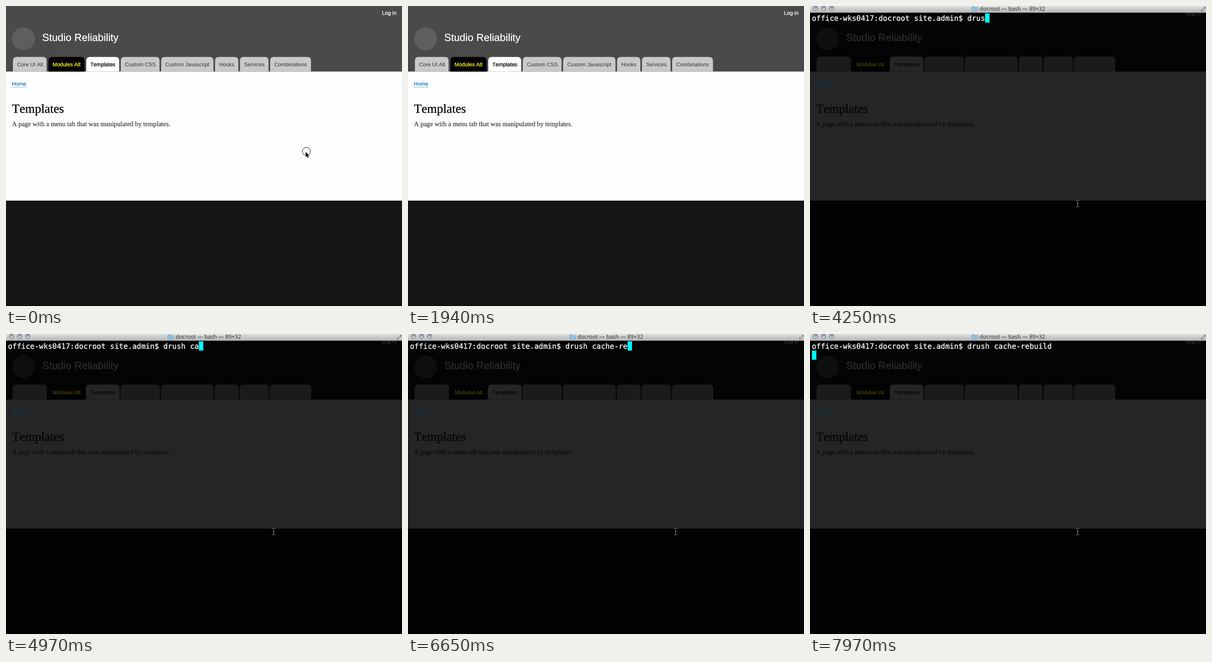
Recreate the animation shown at these times as an HTML page. Size 859 px wide and 652 px high, loop 8000 ms.

```html
<!DOCTYPE html>
<html lang="en">
<head>
<meta charset="utf-8">
<title>Templates</title>
<style>
  html, body { margin: 0; width: 100%; height: 100%; overflow: hidden; background: #151515; }
  svg { display: block; width: 859px; height: 652px; }
  text { text-rendering: geometricPrecision; font-kerning: none; white-space: pre; }
  .sans { font-family: "Liberation Sans", Arial, sans-serif; }
  .serif { font-family: "Liberation Serif", Times, serif; }
  .mono { font: 16px "DejaVu Sans Mono", monospace; fill: #fff; stroke: #fff; stroke-width: .3; }
  .bar { font: 12px "Noto Sans", sans-serif; fill: #333; }
  .dim text { filter: blur(.5px); stroke: currentColor; stroke-width: .5; }
</style>
</head>
<body>
<svg viewBox="0 0 859 652" xmlns="http://www.w3.org/2000/svg">
  <defs>
    <linearGradient id="metal" x2="0" y2="1">
      <stop offset="0" stop-color="#dedede"/><stop offset="1" stop-color="#b4b4b4"/>
    </linearGradient>
    <linearGradient id="bead" x2="0" y2="1">
      <stop offset="0" stop-color="#7d8894"/><stop offset="1" stop-color="#dfe8f0"/>
    </linearGradient>
  </defs>
  <g id="browser">
    <g id="page"></g>
    <circle id="click" cx="651.5" cy="316" r="8.8" fill="none" stroke="#111" stroke-width="1"/>
    <path id="arrow" d="M0 0v11.5l2.7-2.6 1.9 4.3 1.8-.8-1.9-4.2h3.6z" fill="#000" stroke="#fff" stroke-width="1.6" paint-order="stroke"/>
  </g>
  <g id="terminal">
    <g id="backdrop" class="dim"></g>
    <rect width="859" height="15" fill="url(#metal)"/>
    <rect y="14" width="859" height="1" fill="#6a6a6a"/>
    <g id="beads"></g>
    <path d="M351 2.5q0-1 1-1h4l1.5 1.5h5.5q1 0 1 1v6q0 1-1 1h-11q-1 0-1-1z" fill="#8fbfe0" stroke="#6a9cc0" stroke-width=".7"/>
    <text class="bar" x="368" y="9.5">docroot — bash — 89×32</text>
    <path d="M854 2.5h3.5v3.5M857 3l-3.500 3.5M849 7.5v3.5h3.5M849.5 10.5l3.5-3.5" fill="none" stroke="#777" stroke-width="1.2"/>
    <text id="line" class="mono" x="4.2" y="32"></text>
    <rect id="caret" width="9.6" height="20" fill="#0ff"/>
    <path d="M576.5 422.5h2.5l1.5 1 1.5-1h2.5M580.5 423.5v12M578.5 429.5h4M576.5 436.5h2.5l1.5-1 1.5 1h2.5" fill="none" stroke="#888"/>
    <circle id="ring" cx="581.5" cy="428" r="7.9" fill="none" stroke="#fff" stroke-width="1.2"/>
  </g>
</svg>
<script>
const $ = id => document.getElementById(id);

const FOLD = 142.5;
const tabs = [
  ["Core UI Alt", 15, 88], ["Modules Alt", 92, 170.5], ["Templates", 174, 245.5], ["Custom CSS", 249, 333],
  ["Custom Javascript", 336.5, 450], ["Hooks", 453.5, 504], ["Services", 507.5, 569.5], ["Combinations", 573, 661.5]
];

const light = {
  head: "#4a4a4a", body: "#fefefe", foot: "#151515", edge: "#0c0c0c", logo: "#5e5e5e", title: "#fff",
  tab: "#c9c9c9", label: "#333", alt: "#000", altLabel: "#ff0", active: "#fefefe", activeLabel: "#000",
  link: "#0071b3", heading: "#000", copy: "#3b3b3b", login: "#fff", grow: 0, loginY: 19
};

const dark = {
  head: "#040404", body: "#252525", foot: "#030303", edge: "#000", logo: "#0e0e0e", title: "#2b2b2b",
  tab: "#1b1b1b", label: null, alt: "#020202", altLabel: "#3a3a00", active: "#252525", activeLabel: "#0c0c0c",
  link: "#0d344b", heading: "#060606", copy: "#101010", login: "#333", grow: .7, loginY: 20
};

function label(str, x, y, color, { cls = "sans", size = 11.6, weight = 0 } = {}) {
  const stroke = weight ? `stroke="${color}" stroke-width="${weight}"` : "";
  return `<text class="${cls}" x="${x}" y="${y}" fill="${color}" color="${color}" style="font-size:${size}px" ${stroke}>${str}</text>`;
}

function block(top, bottom, color) {
  return `<rect y="${top}" width="859" height="${bottom - top}" fill="${color}"/>`;
}

function tab([name, left, right], c) {
  const special = { "Modules Alt": [c.alt, c.altLabel], "Templates": [c.active, c.activeLabel] }[name];
  const [fill, ink] = special || [c.tab, c.label];
  const x = left - c.grow, end = right + c.grow, y = 110.7 - c.grow;
  return `<path d="M${x} ${FOLD}V${y + 8}q0-8 8-8H${end - 8}q8 0 8 8V${FOLD}z" fill="${fill}"/>` +
    (ink ? label(name, left + 9, 131, ink, { weight: special ? .3 : 0 }) : "");
}

function drawPage(c) {
  return block(0, 143, c.head) + block(FOLD, 423, c.body) + block(423, 652, c.foot) + block(650, 652, c.edge) +
    `<circle cx="38" cy="71.5" r="25" fill="${c.logo}"/>` +
    label("Studio Reliability", 78.5, 76, c.title, { size: 22.4, weight: .3 }) +
    label("Log in", 815.5, c.loginY, c.login, { weight: .3 }) +
    tabs.map(t => tab(t, c)).join("") +
    label("Home", 12.8, 173, c.link, { weight: .2 }) +
    `<path d="M13 176.5h31" stroke="${c.link}" stroke-dasharray="1 1"/>` +
    label("Templates", 13, 231.5, c.heading, { cls: "serif", size: 27.1, weight: .3 }) +
    label("A page with a menu tab that was manipulated by templates.", 13, 261, c.copy,
      { cls: "serif", size: 14.42, weight: .25 });
}

$("page").innerHTML = drawPage(light);
$("backdrop").innerHTML = drawPage(dark) + `<path d="M.5 143V423" stroke="#151515"/>`;
$("beads").innerHTML = [12, 29.5, 47].map(x =>
  `<circle cx="${x}" cy="5" r="4.9" fill="url(#bead)" stroke="#59626b"/>`).join("");

const LOOP = 8000, SWITCH = 2780, ENTER = 7970, CELL = 9.633;
const prompt = "office-wks0417:docroot site.admin$ ";
const command = "drush cache-rebuild";
const keyTimes = [3650, 3890, 4010, 4250, 4370, 4610, 4850, 4970, 5450, 5570, 5690,
  6290, 6410, 6650, 6890, 7130, 7250, 7490, 7610];

// Pointer: time, x, y; held until the next entry.
const pointer = [
  [0, 650, 317], [750, 664, 345], [870, 701, 450], [990, 738, 510], [1110, 748, 525],
  [1350, 748, 530], [1470, 747, 545], [1590, 745, 570], [1710, 743, 600], [1830, 742, 634], [1940, 742, 670]
];

const show = (el, on) => el.setAttribute("visibility", on ? "visible" : "hidden");

function render(t) {
  const inTerminal = t >= SWITCH;
  $("browser").style.display = inTerminal ? "none" : "";
  $("terminal").style.display = inTerminal ? "" : "none";

  const [, x, y] = pointer.filter(p => p[0] <= t).pop();
  $("arrow").setAttribute("transform", `translate(${x} ${y})`);
  show($("click"), t < 120);
  show($("ring"), t < 2900);

  const typed = keyTimes.filter(k => k <= t).length;
  const entered = t >= ENTER;
  $("line").textContent = prompt + command.slice(0, typed);
  $("caret").setAttribute("x", 4.2 + (entered ? 0 : (prompt.length + typed) * CELL));
  $("caret").setAttribute("y", entered ? 36 : 16);
}

const start = performance.now();
function tick() {
  render((performance.now() - start) % LOOP);
  requestAnimationFrame(tick);
}
tick();
</script>
</body>
</html>
```
